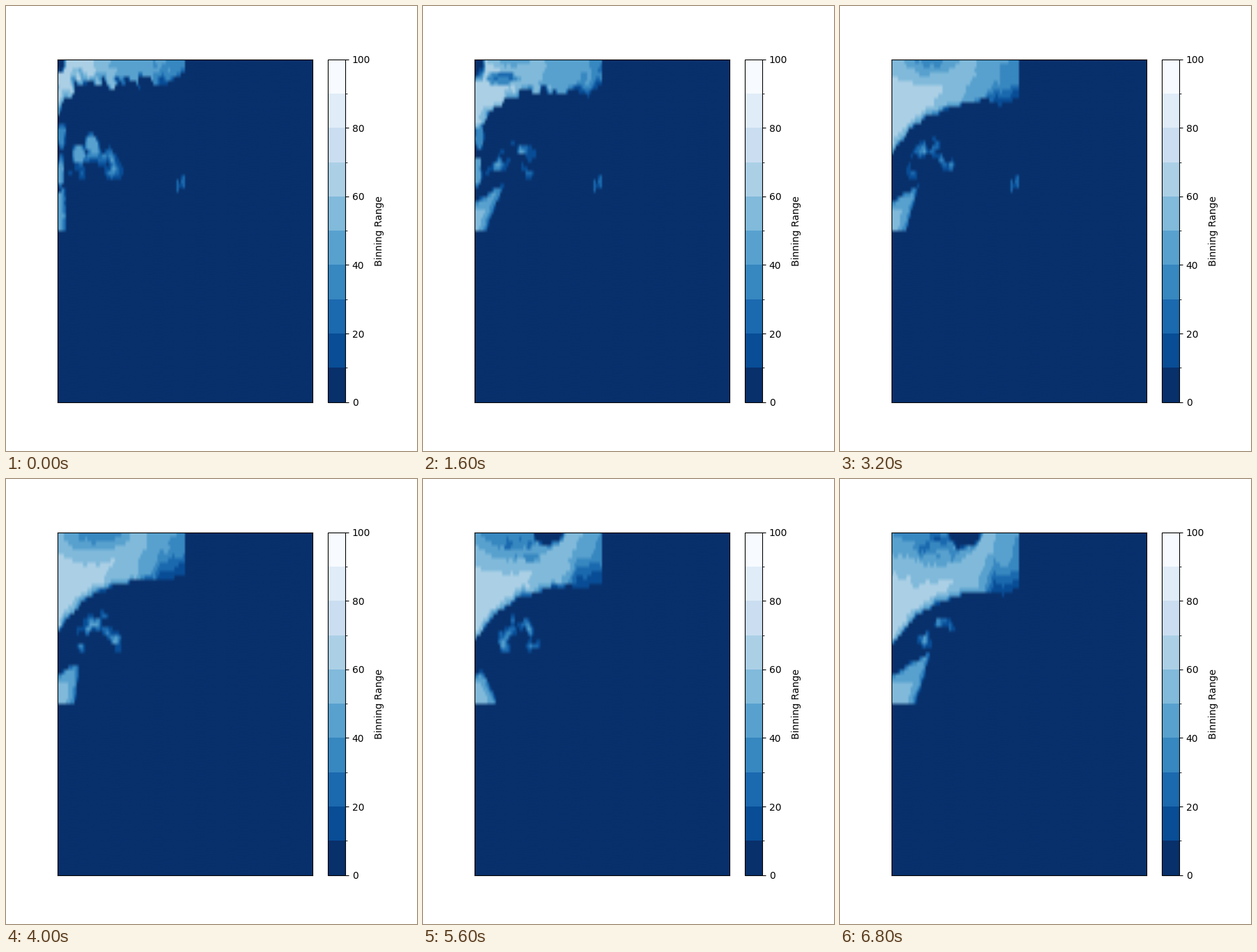
These frames come from a looping animation (590 px wide and 640 px high, 7200 ms). A matplotlib script:

```python
import numpy as np
import matplotlib.pyplot as plt
from matplotlib.animation import FuncAnimation
from matplotlib.colors import BoundaryNorm

FRAMES, STEP = 18, 400
COLS, ROWS = 120, 80
LEFT, TOP, WIDTH, HEIGHT = 73.75, 76.8, 365.8, 492.8

# Cell centres in stage pixels
X, Y = np.meshgrid(LEFT + (np.arange(COLS) + .5) * WIDTH / COLS,
                   TOP + (np.arange(ROWS) + .5) * HEIGHT / ROWS)

rng = np.random.default_rng(7)


def texture():
    """Smooth unit-variance noise."""
    n = rng.standard_normal((ROWS, COLS))
    for axis in (0, 1, 1):
        n = np.roll(n, 1, axis) + 2 * n + np.roll(n, -1, axis)
    return n / n.std()


NOISE_A, NOISE_B = texture(), texture()


def ramp(t, start, end):
    """Smooth step from 0 at start to 1 at end."""
    s = np.clip((t - start) / (end - start), 0, 1)
    return s * s * (3 - 2 * s)


def lerp(a, b, s):
    return a + (b - a) * s


def blob(x, y, rx, ry, noise=0):
    """Soft ellipse of height 1 with an uneven rim."""
    r2 = ((X - x) / rx) ** 2 + ((Y - y) / ry) ** 2
    return np.clip(1.6 * (1 - r2) + .25 * noise * (r2 < 1.2), 0, 1)


def band(t, noise):
    """Cloud band over the top, with a calm eye that opens as it sinks."""
    grow = min(1, 2 * t)
    edge = (108 + 48 * t
            + lerp(50, 88, grow) * np.exp((LEFT - X) / lerp(24, 52, grow))
            + 9 * np.exp(-((X - 233) / 12) ** 2)
            - lerp(14, 0, grow) * ramp(X, 235, 256))
    depth = edge + lerp(5, 1.2, grow) * noise - Y
    v = np.interp(depth, [0, 4, 12, 20], [0, 44, 56, 67])

    # Falls off to the right along slanted fronts
    fronts = [112 + 55 * t, 135 + 55 * t, min(225, 160 + 85 * t),
              225 + 35 * t, 255 + 60 * t]
    v = np.minimum(v, np.interp(X + .4 * (Y - TOP), fronts,
                                [68, 60, 50, 40, 30]))

    # Rings of the eye
    size = .05 + 1.8 * t ** .8
    ring = np.hypot((X - 130) / 1.6, Y - 70) / size
    v = np.minimum(v, np.interp(ring, [0, 18, 27, 42, 60],
                                [33, 40, 50, 60, 68]))

    # Gentle lower rim at the far right
    rim = 8 + lerp(2.5, .7, ramp(t, 0, .65)) * depth
    v = np.minimum(v, rim + 2 * np.maximum(0, 222 - X))
    return np.where((depth > 0) & (v > 12), v + lerp(3, 1, grow) * noise, v)


def gaps(t, noise):
    """Dark holes: the torn corner early on, the open eye later."""
    early = 1 - ramp(t, .36, .46)
    corner = 65 * early * blob(77, 84, 12, 12 + 70 * min(t, .25), noise)
    tear = 60 * np.exp(-((t - .3) / .09) ** 2) * blob(116, 104, 28, 10, noise)
    late = ramp(t, .58, .85)
    core = 60 * late * blob(186 - 8 * t, 78, 24, 8 + 17 * t, noise)
    fray = 20 * late * np.clip(noise, 0, 1) * blob(145, 100, 40, 26)
    return np.maximum.reduce([corner, tear, core, fray])


def specks(t, noise):
    """Broken arc under the band, left-edge patches and thin streaks."""
    angle_r = np.hypot((X - lerp(125, 140, t)) / lerp(32, 22, t),
                       (Y - 238) / 36)
    arc = np.exp(-((angle_r - .85) / .4) ** 2) * ramp(Y, 258, 236)
    arc = arc * np.clip(lerp(21, 10, t) + 19 * noise, 0, 48)
    clump = 46 * (1 - ramp(t, 0, .25)) * np.maximum(
        blob(105, 211, 12, 15, noise), blob(122, 198, 12, 16, noise))
    side = (1 - ramp(t, .36, .5)) * np.maximum(
        42 * blob(78, 238, 7, 24, noise), 34 * blob(80, 186, 8, 22, noise))
    streaks = 24 * (1 - ramp(t, .45, .65)) * np.maximum(
        blob(246.5, 259, 3, 13), blob(254, 252, 3, 15))
    return np.maximum.reduce([arc, clump, side, streaks])


def lower_patch(t, noise):
    """Wedge at the left edge whose tip swings in and out."""
    base = 86 + 24 * t
    tip = np.interp(t, [0, .23, .55, .82, 1], [86, 114, 110, 81, 126])
    right = base + (tip - base) * (321 - Y) / 58 - X
    top = Y - (lerp(266, 281, min(1, 4 * t)) - .6 * (X - LEFT))
    inner = np.minimum(right, top) + .8 * noise
    v = np.interp(inner, [-1, 3, 9, 18], [0, 34, 46, 54])
    return np.where(Y > 245, np.minimum(v, 44 + .2 * (Y - 262)), 0)


def field(frame):
    t = frame / (FRAMES - 1)
    noise = np.cos(.5 * frame) * NOISE_A + np.sin(.5 * frame) * NOISE_B
    v = np.maximum.reduce([band(t, noise) - gaps(t, noise),
                           specks(t, noise), lower_patch(t, noise)])
    # Data cover only the upper left quarter
    v[ROWS // 2:] = 0
    v[:, COLS // 2:] = 0
    return np.clip(v, 0, 69)


fig, ax = plt.subplots(figsize=(5.9, 6.4), dpi=100)
cmap = plt.get_cmap("Blues_r")
norm = BoundaryNorm(np.arange(0, 101, 10), cmap.N)
image = ax.imshow(field(0), cmap=cmap, norm=norm, aspect="auto",
                  interpolation="bilinear", interpolation_stage="rgba")
ax.set(xticks=[], yticks=[])
fig.colorbar(image, ax=ax, label="Binning Range")


def update(frame):
    image.set_data(field(frame))
    return [image]


anim = FuncAnimation(fig, update, frames=FRAMES, interval=STEP,
                     repeat=True, repeat_delay=0)
plt.show()
```
